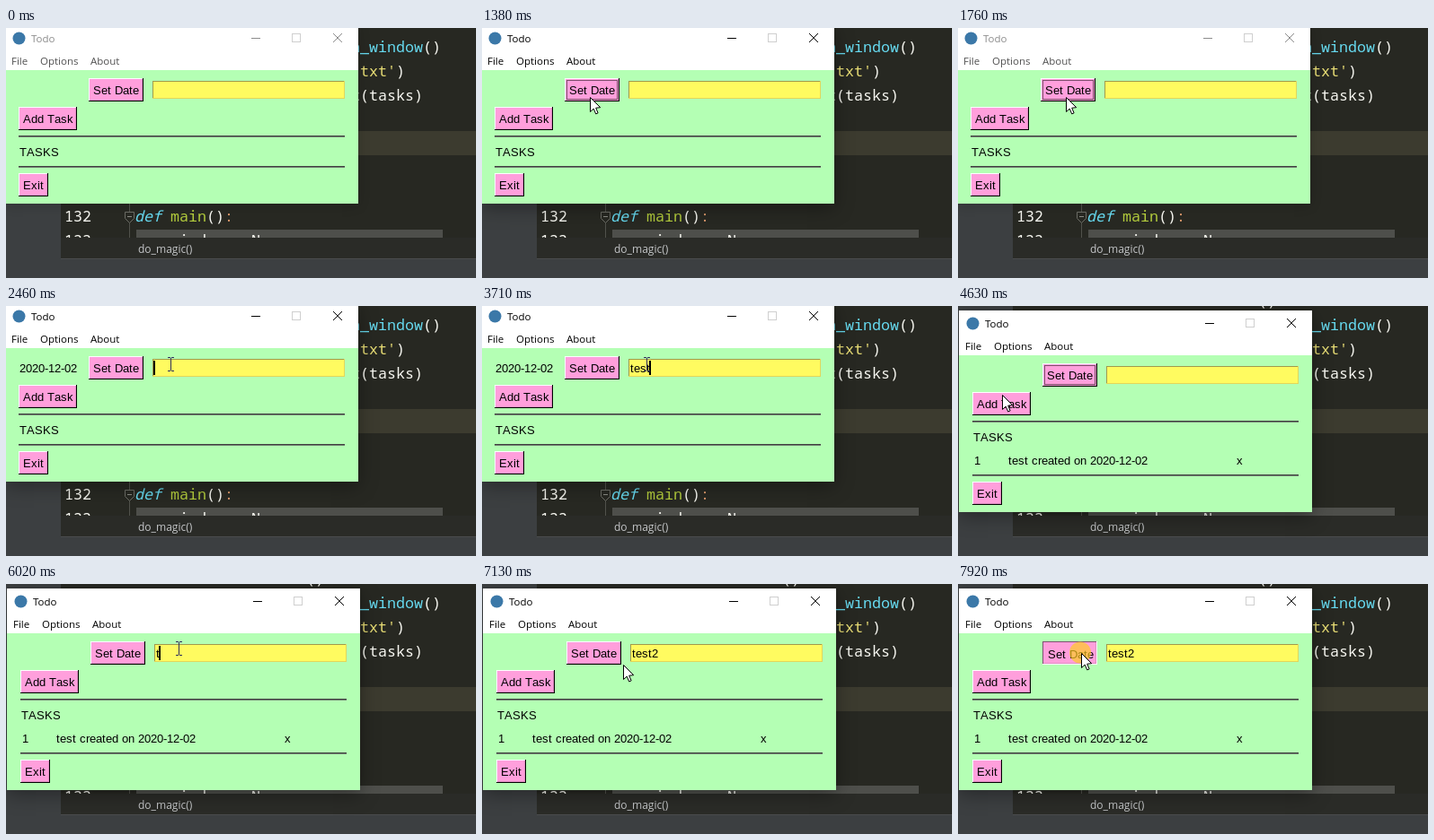
Recreate the animation shown at these times as an HTML page with a canvas. Size 523x279 px, loop 8000 ms.

```html
<!DOCTYPE html>
<html lang="en">
<head>
<meta charset="utf-8">
<title>Todo</title>
<style>
  html, body { margin: 0; width: 523px; height: 279px; overflow: hidden; background: #3c3f41; }
  canvas { display: block; }
</style>
</head>
<body>
<canvas id="stage" width="523" height="279"></canvas>
<script>
const ctx = document.getElementById('stage').getContext('2d');
const LOOP = 8000;
const UI = '"Open Sans", "Noto Sans", sans-serif';
const FORM = '13px "Liberation Sans", Arial, sans-serif';
const CODE = '16.67px "Noto Sans Mono", "DejaVu Sans Mono", monospace';
const WHITE = '#f8f8f2', CYAN = '#66d9ef', YELLOW = '#e6db74';

// Pointer path: time, x, y
const PATH = [
  [230, 428, 242], [420, 372, 190], [600, 250, 110], [750, 140, 56], [860, 94, 38],
  [980, 99, 47], [1060, 108, 60], [1130, 120, 77], [1880, 120, 77], [2080, 183, 65],
  [3800, 183, 65], [4000, 120, 80], [4250, 49, 99], [4750, 49, 99], [5170, 118, 89],
  [5400, 192, 72], [7000, 192, 72], [7210, 136, 101], [7380, 135, 100], [7840, 137, 77]
];
const CLICKS = [
  [1300, 1380, 'date'], [2310, 2460, 'input'], [4400, 4480, 'add'],
  [5490, 5640, 'input'], [7920, 8000, 'date']
];
const CARET = [[2310, 2920], [3240, 3860], [4150, 4550], [5490, 6100], [6420, 7060], [7380, 7920]];
const FOCUS = [[1300, 2310], [4550, 5490]];
const TYPING = [
  [3090, 't'], [3330, 'te'], [3560, 'tes'], [3710, 'test'], [4550, ''],
  [6020, 't'], [6270, 'te'], [6420, 'tes'], [6590, 'test'], [6890, 'test2']
];
const REBUILT = 4550;

const during = (spans, t) => spans.some(([a, b]) => t >= a && t < b);

function rect(x, y, w, h, color) {
  ctx.fillStyle = color;
  ctx.fillRect(x, y, w, h);
}

function line(color, ...pts) {
  ctx.strokeStyle = color;
  ctx.lineWidth = 1;
  ctx.beginPath();
  pts.forEach(([x, y]) => ctx.lineTo(x, y));
  ctx.stroke();
}

function text(str, x, y, font, color) {
  ctx.font = font;
  ctx.fillStyle = color;
  ctx.fillText(str, x, y);
}

// Form text sits on whole-pixel advances; returns the end position
function formText(str, x, y) {
  ctx.font = FORM;
  ctx.fillStyle = '#000';
  for (const ch of str) {
    ctx.fillText(ch, x, y);
    x += Math.round(ctx.measureText(ch).width + 0.01);
  }
  return x;
}

function codeLine(x, y, ...parts) {
  for (const [str, color, style = ''] of parts) {
    text(str, x, y, style + CODE, color);
    x += str.length * 10;
  }
}

function drawEditor() {
  rect(0, 0, 523, 279, '#3c3f41');
  rect(61, 0, 462, 258, '#272822');
  rect(61, 115, 462, 27, '#3c3b2f');

  ctx.save();
  ctx.beginPath();
  ctx.rect(61, 0, 462, 234);
  ctx.clip();
  codeLine(334, 0, ['()', WHITE]);
  codeLine(384, 27, ['n_window', CYAN], ['()', WHITE]);
  codeLine(394, 54, ["txt'", YELLOW], [')', WHITE]);
  codeLine(384, 81, ['t(tasks)', WHITE]);
  line('#50514b', [137.5, 180], [137.5, 234]);
  ctx.beginPath();
  [[132.5, 205.5], [142.5, 205.5], [142.5, 212.5], [137.5, 217.5], [132.5, 212.5]]
    .forEach(([x, y]) => ctx.lineTo(x, y));
  ctx.closePath();
  ctx.fillStyle = '#272822';
  ctx.fill();
  ctx.strokeStyle = '#6c6d66';
  ctx.stroke();
  line('#8a8b84', [135, 210.5], [140, 210.5]);
  codeLine(65, 216, ['132', WHITE]);
  codeLine(143, 216, ['def', CYAN, 'italic '], [' main', '#b3cc3c'], ['()', WHITE], [':', '#e8a070']);
  codeLine(65, 243, ['133', WHITE]);
  rect(145, 225, 341, 9, '#4e4f4b');
  codeLine(183, 243, ['window = None', WHITE]);
  ctx.restore();

  rect(61, 234, 462, 24, '#2a2b27');
  rect(61, 257, 462, 1, '#4a4c4d');
  text('do_magic()', 147, 251, '12px ' + UI, '#c4c6c8');
}

function button(label, x, y, w, h, pressed, focused) {
  rect(x, y, w, h, pressed ? '#fff' : '#000');
  rect(x, y, w - 1, h - 1, pressed ? '#7d5070' : '#fff');
  rect(x + 1, y + 1, w - 2, h - 2, '#e08fc2');
  rect(x + 1, y + 1, w - 3, h - 3, '#ff9fdc');
  const d = pressed ? 1 : 0;
  formText(label, x + 5 + d, y + 18 + d);
  if (focused) {
    ctx.save();
    ctx.setLineDash([1, 1]);
    ctx.lineWidth = 1;
    ctx.strokeStyle = '#000';
    ctx.strokeRect(x + 2.5, y + 2.5, w - 5, h - 5);
    ctx.restore();
  }
}

function divider(y) {
  rect(14, y - 1, 363, 1, '#404040');
  rect(14, y, 363, 1, '#6f7f6f');
}

function drawWindow(t) {
  const rebuilt = t >= REBUILT;
  const active = t >= 1300 && !(t >= 1530 && t < 1910);
  const extra = rebuilt ? 26 : 0;
  const click = CLICKS.find(([a, b]) => t >= a && t < b);
  const down = click ? click[2] : '';
  const ink = active ? '#000' : '#8c8c8c';

  ctx.save();
  if (rebuilt) ctx.translate(2, 8);
  if (rebuilt && t < 4630) ctx.globalAlpha = 0.75;

  ctx.save();
  ctx.shadowColor = active ? 'rgba(0,0,0,.35)' : 'rgba(0,0,0,.18)';
  ctx.shadowBlur = active ? 20 : 12;
  ctx.shadowOffsetY = active ? 5 : 2;
  rect(-1, -3, 393, 199 + extra, '#fff');
  ctx.restore();

  // Title bar and menu
  ctx.fillStyle = '#3b78a8';
  ctx.beginPath();
  ctx.arc(14.5, 11.5, 7, 0, Math.PI * 2);
  ctx.fill();
  text('Todo', 28, 16, '11.5px ' + UI, ink);
  rect(273, 11, 10, 1, ink);
  ctx.lineWidth = 1;
  ctx.strokeStyle = '#cfcfcf';
  ctx.strokeRect(318.5, 6.5, 9, 9);
  line(ink, [364, 6], [374, 16]);
  line(ink, [374, 6], [364, 16]);
  const menuInk = active ? '#000' : '#505050';
  [['File', 6], ['Options', 38], ['About', 94]]
    .forEach(([s, x]) => text(s, x, 41, '11.5px ' + UI, menuInk));

  // Form
  rect(-1, 47, 393, 149 + extra, '#b4ffb4');
  if (t >= 1910 && !rebuilt) formText('2020-12-02', 15, 74);
  button('Set Date', 92, 56, 61, 26, down === 'date', during(FOCUS, t));
  rect(163, 59, 214, 20, '#e2d65a');
  rect(163, 59, 213, 1, '#a09a4c');
  rect(163, 59, 1, 19, '#a09a4c');
  rect(164, 60, 212, 18, '#fffb60');
  const typed = TYPING.filter(([at]) => t >= at).pop();
  const end = formText(typed ? typed[1] : '', 165, 74);
  if (during(CARET, t)) rect(end - 1, 61, 2, 16, '#000');
  button('Add Task', 14, 88, 65, 26, down === 'add');
  divider(121);
  formText('TASKS', 15, 143);
  if (rebuilt) {
    formText('1', 16, 169);
    formText('test created on 2020-12-02', 54, 169);
    formText('x', 308, 169);
  }
  divider(155 + extra);
  button('Exit', 14, 162 + extra, 33, 26);
  ctx.restore();
}

function pointerAt(t) {
  const i = PATH.findIndex(p => p[0] > t);
  if (i < 0) return PATH[PATH.length - 1].slice(1);
  const [a, x0, y0] = PATH[i - 1], [b, x1, y1] = PATH[i];
  const k = (t - a) / (b - a);
  return [Math.round(x0 + (x1 - x0) * k), Math.round(y0 + (y1 - y0) * k)];
}

function drawPointer(t) {
  if (t < PATH[0][0]) return;
  const [x, y] = pointerAt(t);
  const [dx, dy] = t >= REBUILT ? [2, 8] : [0, 0];
  const fx = x - dx, fy = y - dy;

  if (during(CLICKS, t)) {
    ctx.fillStyle = 'rgba(255,204,30,.68)';
    ctx.beginPath();
    ctx.arc(x - 1, y - 0.5, 12, 0, Math.PI * 2);
    ctx.fill();
  }
  if (fx >= 163 && fx < 377 && fy >= 59 && fy < 79) {
    const ink = '#30305c';
    rect(x, y - 7, 1, 14, ink);
    for (const end of [-8, 7]) {
      rect(x - 3, y + end, 3, 1, ink);
      rect(x + 1, y + end, 3, 1, ink);
    }
    return;
  }
  ctx.beginPath();
  [[0, 0], [0, 16], [3.7, 12.6], [6.2, 18.4], [8.6, 17.4], [6.2, 11.7], [11.2, 11.2]]
    .forEach(([px, py]) => ctx.lineTo(x + px + 0.5, y + py + 0.5));
  ctx.closePath();
  ctx.fillStyle = '#fff';
  ctx.fill();
  ctx.strokeStyle = '#000';
  ctx.lineWidth = 1;
  ctx.stroke();
}

let start;
function tick(now) {
  start ??= now;
  const t = (now - start) % LOOP;
  drawEditor();
  drawWindow(t);
  drawPointer(t);
  requestAnimationFrame(tick);
}
requestAnimationFrame(tick);
</script>
</body>
</html>
```
